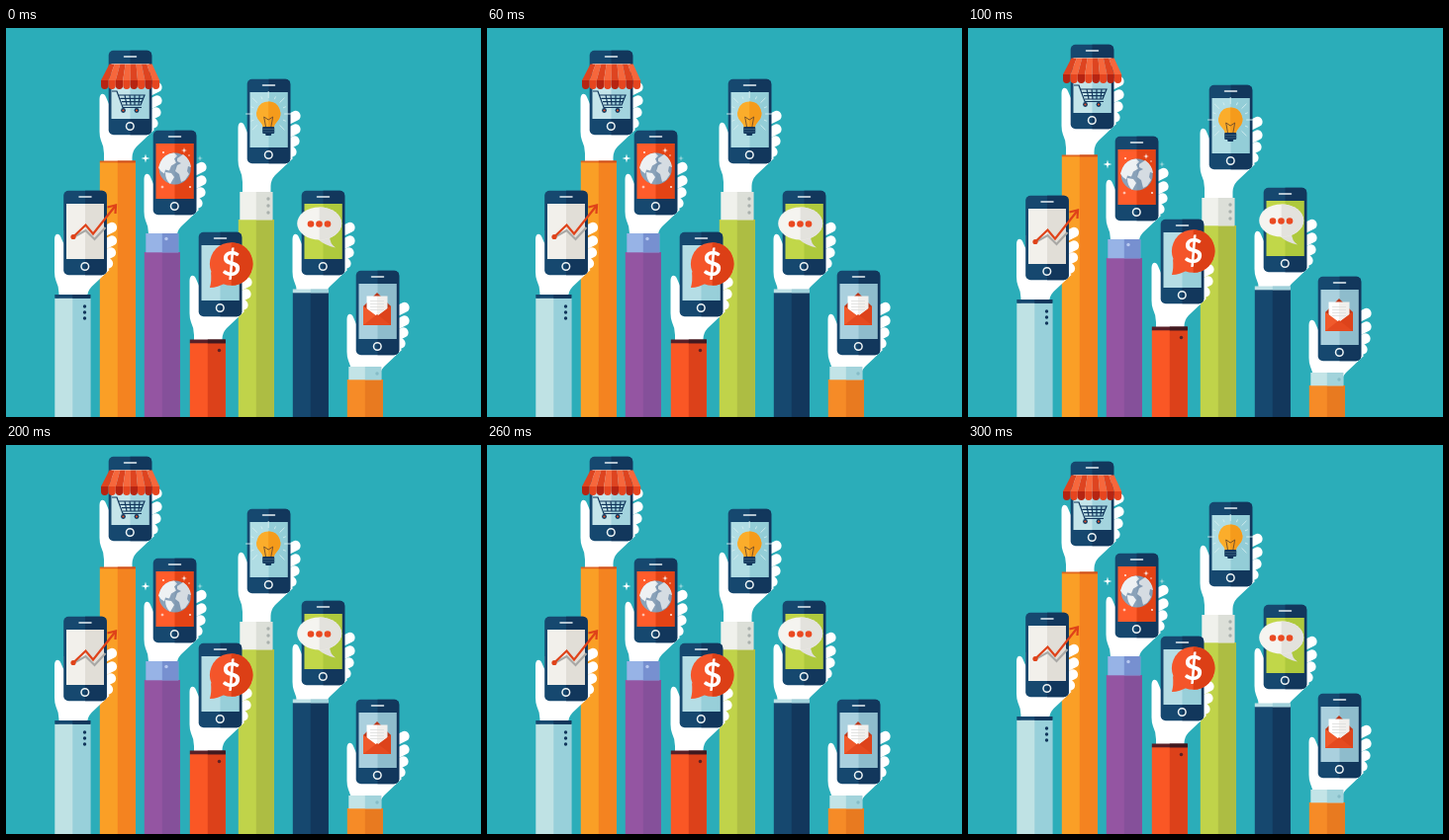
Recreate the animation shown at these times as an HTML page. Size 480 by 394 pixels, loop 400 ms.

```html
<!DOCTYPE html>
<html lang="en">
<head>
<meta charset="utf-8">
<title>Raised phones</title>
<style>
html, body { margin: 0; width: 100%; height: 100%; overflow: hidden; background: #2badb9; }
svg { display: block; width: 100%; height: 100%; }
</style>
</head>
<body>
<svg id="stage" viewBox="0 0 480 394"></svg>
<script>
const NAVY = '#16486f', DARK = '#12375c', RED = '#f4552a', DEEP = '#dc3f16';

const rect = (x, y, w, h, fill, rx = 0) =>
  `<rect x="${x}" y="${y}" width="${w}" height="${h}" rx="${rx}" fill="${fill}"/>`;
const dot = (x, y, r, fill) => `<circle cx="${x}" cy="${y}" r="${r}" fill="${fill}"/>`;
const shape = (d, fill) => `<path d="${d}" fill="${fill}"/>`;
const line = (d, color, w, cap = 'butt') =>
  `<path d="${d}" fill="none" stroke="${color}" stroke-width="${w}" stroke-linecap="${cap}"/>`;
const halves = (x, y, w, h, [a, b]) => rect(x, y, w, h, a) + rect(x + w / 2, y, w / 2, h, b);
const star = (x, y, r, fill = '#fff') => {
  const q = r * 0.2;
  return shape(`M${x} ${y - r}l${q} ${r - q} ${r - q} ${q} ${q - r} ${q} ${-q} ${r - q} ${-q} ${q - r} ${q - r} ${-q} ${r - q} ${-q}z`, fill);
};

const icons = {
  cart() {
    let s = '';
    for (let i = 0; i < 8; i++) {
      const top = 0.5 + i * 5.4, low = -8 + i * 7.4, odd = i % 2;
      s += shape(`M${top} 13.5h5.4L${low + 7.4} 30h-7.4z`, odd ? '#f6673c' : '#de4420') +
        shape(`M${low} 30h7.4v5a3.7 4 0 0 1-7.4 0z`, odd ? '#e6451f' : '#b62412');
    }
    s += line('M3 41h5l6 16.5h19M10 45h26l-4 10H14M11.5 48.3h23M13 51.6h20.5M16 45l2 10M21 45l1 10M26 45v10M31 45l-1 10', DARK, 1.2);
    return s + [14.5, 28].map(x => dot(x, 60.5, 2.4, DARK) + dot(x, 60.5, 1.1, '#e8502a')).join('');
  },
  globe() {
    return dot(21.7, 38.5, 16, '#8aa2b9') +
      shape('M7 32q4-9 14-9.500l3 3-3 3 2 4-5 3-2 5-4-1-1 4q-4-2-6-6zM12 42l6 1 3 4-4 7q-5-4-5-12z', '#eef1f3') +
      shape('M24 28l6-4q7 5 8 13l-3-1-1 5 2 3-4 6-4 2-2-8-4-3 2-6 4-2-4-2z', '#e8ecef') +
      shape('M21.7 22.500a16 16 0 0 1 0 32z', 'rgba(50,80,115,.1)') +
      star(-8, 28, 4.5) + star(31, 20, 3) + star(47, 28, 3, '#a9dce0') +
      dot(10, 22, .9, '#fff') + dot(37, 57, .9, '#fff') + star(9, 57, 2) + dot(36, 25, .7, '#fff');
  },
  bulb() {
    let rays = '';
    for (let i = 0; i < 16; i++) {
      const a = i * Math.PI / 8, c = Math.cos(a), s = Math.sin(a), far = i % 2 ? 19 : 23;
      if (s < .8) rays += `M${21.2 + 16 * c} ${35 + 16 * s}L${21.2 + far * c} ${35 + far * s}`;
    }
    return line(rays, '#d5eef0', .9) +
      shape('M21.2 22.500a12 12 0 0 0-8.500 20.500q3 3 3 6h11q0-3 3-6a12 12 0 0 0-8.500-20.500z', '#fbad2b') +
      shape('M21.2 22.500v26.500h5.500q0-3 3-6a12 12 0 0 0-8.500-20.500z', '#f59b1b') +
      line('M18.7 49l-2-11 4.500 3 4.500-3-2 11', '#7a542a', 1) +
      rect(15.2, 48, 12, 7, DARK, 1) + rect(18.2, 54.500, 6, 2.5, DARK, 1) +
      line('M15.2 50.500h12M15.2 53h12', '#3d6685', .8);
  },
  chart() {
    return line('M9.500 47l12.500-7 9 9 11-12', '#a9a8a5', 2.2) +
      line('M9.500 46.500l12.500-12 7.500 9 23-29', '#df4219', 2.2) +
      line('M44 16.500l8.500-2-.5 8.500', '#df4219', 2.2) + dot(9.5, 46.5, 2.6, '#df4219');
  },
  dollar() {
    return shape('M12 40q1 9-1 16 8 0 16-5z', RED) + dot(32.7, 32, 21.8, RED) +
      shape('M32.700 10.200a21.800 21.800 0 0 1 0 43.600z', DEEP) +
      '<text x="32.700" y="44" text-anchor="middle" font-family="Lato, sans-serif" font-weight="700" font-size="34" fill="#fff">$</text>';
  },
  chat() {
    return shape('M15 48q9 8 19 9.500-6-4-6-12z', '#e2e1dc') +
      '<ellipse cx="17.700" cy="33" rx="22.500" ry="16.500" fill="#f5f4f0"/>' +
      shape('M17.700 16.500a22.500 16.500 0 0 1 0 33z', '#e3e2dd') +
      [9, 17.5, 26].map(x => dot(x, 33.5, 3.3, '#ea4a22')).join('');
  },
  mail() {
    return shape('M7 36L21 22l14 14v6H7z', '#b9371a') +
      rect(10.5, 25.5, 10.5, 22, '#fff') + rect(21, 25.5, 10.5, 22, '#f1efec') +
      line('M14 30.500h14M14 33.500h14M14 36.500h14M14 39.500h14', '#dfe0df', .9) +
      shape('M7 35.500l14 10.500 14-10.500v19.500H7z', '#f05a2c') +
      shape('M21 46l14-10.500v19.500H21z', '#dd431b') +
      shape('M7 55L21 44l14 11z', '#e54a20');
  }
};

// wrist: distance from phone top to sleeve; cuff: height and two tones
const hands = [
  { icon: 'cart', x: 104, y: [23, 17, 12], wrist: 111.5, sleeve: ['#fa9f26', '#f48320'],
    cuff: [1.5, '#e0651f', '#cf501d'], screen: ['#c5e5ea', '#a3d4de'] },
  { icon: 'globe', x: 149, y: [104, 110, 115], wrist: 104, sleeve: ['#9455a2', '#85509a'],
    cuff: [19, '#97b3e6', '#7790d0'], buttons: [13, 5.5, 0, '#b9caf0'], screen: ['#ff5c2b', '#e34315'] },
  { icon: 'bulb', x: 244, y: [52, 58, 65], wrist: 114, sleeve: ['#c0d34a', '#adbd43'],
    cuff: [28, '#f0f1ec', '#dcdfd8'], buttons: [21, 7, 7, '#a9b0ac'], screen: ['#b0dde4', '#93cdd7'] },
  { icon: 'chart', x: 58.5, y: [165, 170, 174], wrist: 105, sleeve: ['#bfe2e4', '#98d0da'],
    cuff: [3.5, NAVY, DARK], buttons: [21, 12, 6, DARK], screen: ['#f2f0eb', '#e1ded7'] },
  { icon: 'dollar', x: 195, y: [207, 194, 201], wrist: 108.5, sleeve: ['#fa5725', '#dc411a'],
    cuff: [3.5, '#5a2028', '#40191f'], buttons: [20.5, 11, 0, '#5d2023'], screen: ['#b5dde5', '#98cfd9'] },
  { icon: 'chat', x: 299, y: [165, 162, 158], wrist: 99.5, sleeve: [NAVY, DARK],
    cuff: [3.5, '#bfe1e6', '#9fd0da'], screen: ['#c1d749', '#aec93d'] },
  { icon: 'mail', x: 354, y: [246, 252, 258], wrist: 97, sleeve: ['#f68b27', '#e87a20'],
    cuff: [13, '#c3e4e7', '#a2d3db'], buttons: [21, 7, 0, '#86bcc7'], screen: ['#aad0de', '#8ebccc'] }
];

function arm({ wrist, sleeve, cuff: [h, ...tones], buttons }) {
  const inset = h > 5 ? 1.5 : 0;
  let s = halves(-9.2, wrist + h, 36, 420, sleeve) +
    halves(inset - 9.2, wrist, 36 - 2 * inset, h + .3, tones);
  if (buttons) {
    const [x, y, gap, color] = buttons;
    for (let i = 0; i < (gap ? 3 : 1); i++) s += dot(x, wrist + y + i * gap, 1.7, color);
  }
  return s;
}

function palm(wrist) {
  const fingers = [[48.5, 37], [48.5, 50.5], [47.5, 62.5], [44.5, 73.5]]
    .map(([x, y]) => `M${x - 12} ${y + 6}L${x} ${y}`).join('');
  const end = Math.max(wrist, 108) + 1;
  return shape(`M-9.500 49C-9.500 43-5 42-3 47L0 54V40H41V75L46 80 28 97Q23.500 102 23.500 108V${end}H-5V104Q-5 97-8 91Q-9.500 87-9.500 82z`, '#fff') +
    line(fingers, '#fff', 10.3, 'round');
}

function phone(screen) {
  return rect(-.3, -.3, 43.6, 85.6, NAVY, 5) +
    shape('M21.500-.3H38.300a5 5 0 0 1 5 5V80.300a5 5 0 0 1-5 5H21.500z', DARK) +
    halves(2.5, 13, 38, 56, screen) +
    line('M15.500 6h12', '#e8f0f3', 1.5, 'round') +
    '<circle cx="21.300" cy="76.500" r="3.800" fill="none" stroke="#eef4f5" stroke-width="1.500"/>';
}

const stage = document.getElementById('stage');
stage.innerHTML = rect(0, 0, 480, 394, '#2badb9') + hands.map(h =>
  `<g class="hand">${palm(h.wrist)}${arm(h)}${phone(h.screen)}${icons[h.icon]()}</g>`).join('');
const groups = [...stage.querySelectorAll('.hand')];

// hard steps: first, middle, last, middle
const order = [0, 1, 2, 1];
function draw(ms) {
  const pose = order[Math.floor(ms / 100) % 4];
  hands.forEach((h, i) => groups[i].setAttribute('transform', `translate(${h.x} ${h.y[pose]})`));
}

const start = performance.now();
function tick() {
  draw(performance.now() - start);
  requestAnimationFrame(tick);
}
tick();
</script>
</body>
</html>
```
